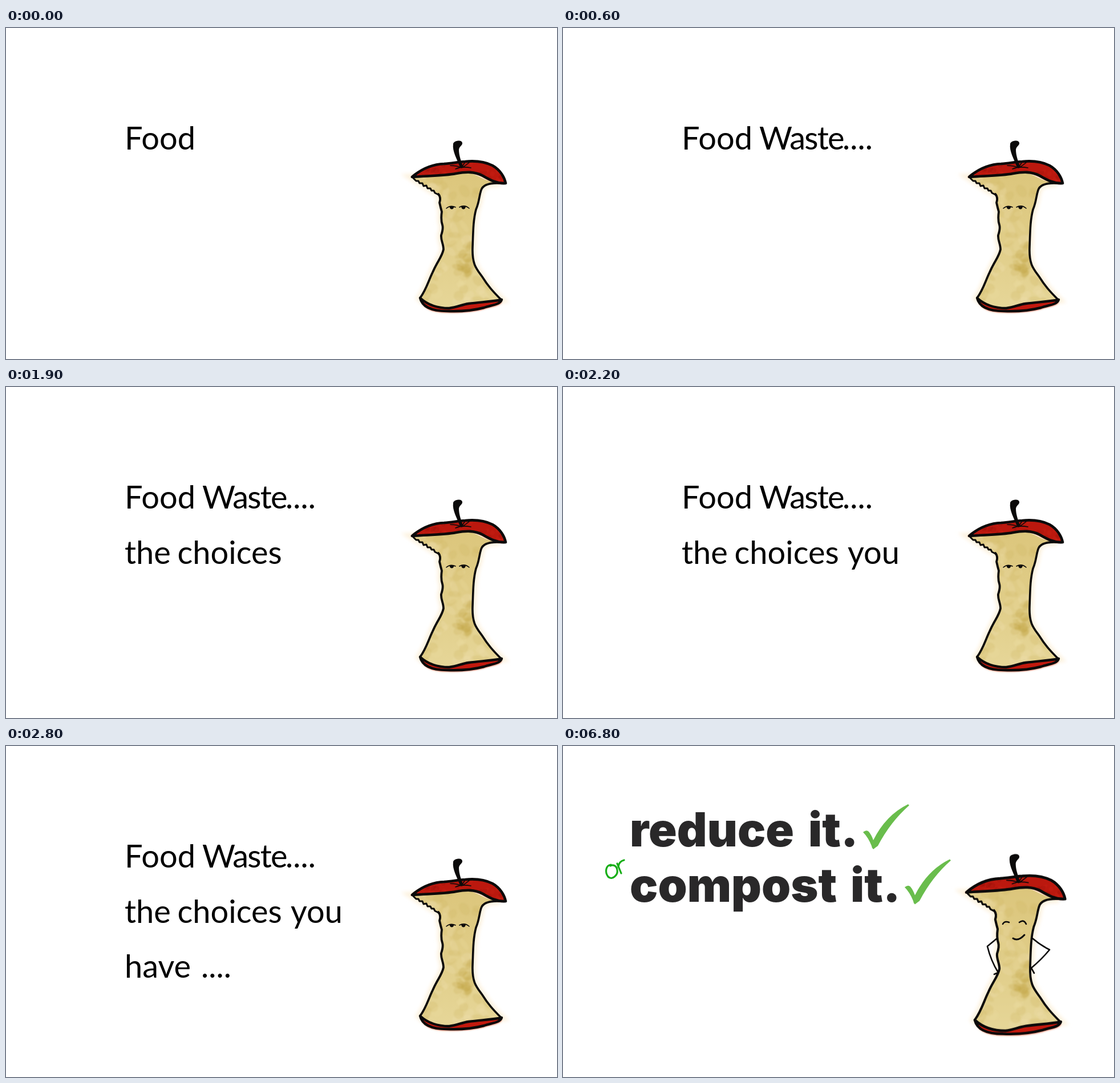
Animation, 966 px wide and 580 px high, one loop 8000 ms. Source, as an HTML page:

```html
<!DOCTYPE html>
<html lang="en">
<head>
<meta charset="utf-8">
<title>Food waste choices</title>
<style>
  html, body { margin: 0; width: 100%; height: 100%; overflow: hidden; background: #fff; }
  svg { display: block; width: 100%; height: 100%; }
  .line { font: 400 56px Lato, sans-serif; fill: #000; }
  .tight { letter-spacing: -.03em; }
  .bold { font: 900 82px Inter, sans-serif; fill: #292829; }
  .ink { fill: none; stroke: #0b0a0a; stroke-linecap: round; stroke-linejoin: round; }
</style>
</head>
<body>
<svg viewBox="0 0 966 580">
  <defs>
    <linearGradient id="flesh" x2="0" y2="1">
      <stop offset="0" stop-color="#dcc67c"/>
      <stop offset=".5" stop-color="#e0cd88"/>
      <stop offset="1" stop-color="#e6d698"/>
    </linearGradient>
    <path id="body" d="M713 262 L741 260 C772 259 783 253 803 253 C824 252 836 270 866 272
      C846 271 836 275 833 284 C829 296 830 304 824 318 C819 337 819 357 818 385 C817 415 825 422 835 436
      C845 452 853 461 868 476 L806 485 Q781 494 760 490 Q739 486 726 473 C737 458 741 442 748 428
      C756 409 764 402 767 388 C767 378 762 372 763 363 Q767 351 765 345 Q762 336 764 322 Q762 315 760 306 Q763 297 758 291 L740 280Z"/>
    <path id="cap" d="M712 261 C726 249 743 239 768 238 C783 237 790 235 805 234 C825 232 841 235 853 241
      C867 249 874 262 876 272 C860 273 848 266 836 259 C821 251 806 252 789 255 C768 259 738 259 712 261Z"/>
    <path id="base" d="M726 473 C738 484 756 491 777 491 C792 489 798 485 811 483 C832 480 849 480 869 476
      C866 485 853 485 838 490 C819 495 796 497 773 496 C747 496 730 490 726 473Z"/>
    <path id="check" fill="#69bd4c" d="M526 151 Q532 146 536 150 Q541 156 544 165 Q566 121 605 102 L607 104
      Q574 133 552 175 Q549 177 544 181 Q541 178 541 175 Q535 160 526 151Z"/>
    <clipPath id="inBody"><use href="#body"/></clipPath>
    <clipPath id="inCap"><use href="#cap"/></clipPath>
    <filter id="soft" x="-30%" y="-30%" width="160%" height="160%"><feGaussianBlur stdDeviation="3"/></filter>
    <filter id="wash" x="-30%" y="-30%" width="160%" height="160%"><feGaussianBlur stdDeviation="1"/></filter>
    <g id="apple">
      <use href="#body" fill="#fdf3e0" stroke="#fdf3e0" stroke-width="14" filter="url(#soft)"/>
      <g fill="#ee5a38" filter="url(#wash)">
        <use href="#cap" x="-3" y="1" opacity=".75"/>
        <use href="#base" x="1" y="3" opacity=".7"/>
      </g>
      <use href="#body" fill="url(#flesh)"/>
      <g clip-path="url(#inBody)"><g id="mottle" filter="url(#wash)"></g></g>
      <use href="#cap" fill="#bb180e"/>
      <g id="grain" clip-path="url(#inCap)"></g>
      <use href="#base" fill="#c2190e"/>
      <use href="#cap" class="ink" stroke-width="4.6"/>
      <use href="#base" class="ink" stroke-width="4.4"/>
      <path class="ink" stroke-width="3.6" d="M866 272 C846 271 836 275 833 284 C829 296 830 304 824 318
        C819 337 819 357 818 385 C817 415 825 422 835 436 C845 452 853 461 868 476"/>
      <path class="ink" stroke-width="3.8" d="M758 291 Q763 297 760 306 Q762 315 764 322 Q762 336 765 345 Q767 351 763 363
        C762 372 767 378 767 388 C764 402 756 409 748 428 C741 442 737 458 726 473"/>
      <path class="ink" stroke-width="3" d="M714 263 l5 5 4 0 2 4 5 0 2 5 5 -1 2 5 5 0 2 4 4 0 2 4 6 3"/>
      <path class="ink" stroke-width="1.6" d="M779 241 Q790 241 799 245 Q806 241 813 235 M788 247 Q800 242 815 245 M799 244 L806 233"/>
      <path fill="#0b0a0a" d="M784 203 C785 197 800 195 800 202 C800 206 795 207 794 213 C794 224 798 233 802 245
        L796 244 C791 230 782 216 784 203Z"/>
    </g>
  </defs>

  <g data-from="0" data-to="4800">
    <use href="#apple"/>
    <path class="ink" stroke-width="1.6" d="M772 316 Q779 310 788 314 M795 314 Q804 309 812 316"/>
    <path d="M777.5 313 h8 q-1 4.500 -4 4.500 t-4 -4.500z M798 313 h8 q-1 4.500 -4 4.500 t-4 -4.500z" fill="#0b0a0a"/>
  </g>

  <g data-from="4800" data-to="8000">
    <use href="#apple" transform="translate(801 345) scale(1.055) translate(-801 -345)"/>
    <path class="ink" stroke-width="2.6" d="M771 312 Q774 306 782 309 M800 309 Q808 303 812 312"/>
    <path class="ink" stroke-width="3" d="M789 337 Q798 343 809 331"/>
    <path class="ink" stroke-width="2.6" d="M761 337 L744 351 Q750 376 763 397 L756 400 M823 337 Q837 349 853 357 Q839 374 821 389 L826 398"/>
    <text class="bold" x="117" y="176">reduce</text>
    <text class="bold" x="430" y="176">it.</text>
    <use href="#check"/>
  </g>

  <g data-from="6800" data-to="8000">
    <text class="bold" x="117" y="272.5">compost</text>
    <text class="bold" x="504" y="272.5">it.</text>
    <use href="#check" x="73" y="96.5"/>
    <path fill="none" stroke="#17ae17" stroke-width="3.2" stroke-linecap="round"
      d="M84 208 C75 209 73 221 79 229 C86 236 97 226 95 217 C94 210 88 207 83 210 M95 206 L102 223 M97 212 Q98 202 107 200"/>
  </g>
  <g id="words"></g>
</svg>
<script>
const LOOP = 8000;
const svgNode = (parent, tag, attributes) => {
  const node = document.createElementNS("http://www.w3.org/2000/svg", tag);
  for (const key in attributes) node.setAttribute(key, attributes[key]);
  return parent.appendChild(node);
};
const byId = id => document.getElementById(id);

let seed = 17;
const random = (low, high) => {
  seed = (seed * 16807) % 2147483647;
  return low + (high - low) * seed / 2147483647;
};

// Overlapping watercolour dabs
function dab(group, count, [left, right, top, bottom], size, colors, opacity) {
  for (let i = 0; i < count; i++) {
    const x = random(left, right), y = random(top, bottom);
    svgNode(group, "ellipse", {
      cx: x, cy: y, rx: random(size * .5, size), ry: random(size * .3, size * .7),
      transform: `rotate(${random(-70, 70)} ${x} ${y})`,
      fill: colors[i % colors.length], opacity
    });
  }
}
dab(byId("mottle"), 130, [725, 865, 255, 490], 13, ["#eee0ae", "#d0b965", "#eadb9f"], .25);
dab(byId("mottle"), 16, [792, 814, 375, 435], 12, ["#b99a35", "#c4a947"], .22);
dab(byId("grain"), 70, [712, 876, 234, 272], 7, ["#860d08", "#d0281a"], .22);

const words = [
  ["Food", 208, 213, 0], ["Waste", 344, 213, 300, "tight"], ["....", 490, 213, 600],
  ["the", 208, 309.5, 1600], ["choices", 300.5, 309.5, 1900], ["you", 499, 309.5, 2200],
  ["have", 208, 406, 2500], ["....", 342, 406, 2800]
];
for (const [word, x, y, from, spacing = ""] of words) {
  svgNode(byId("words"), "text", {
    class: `line ${spacing}`, x, y, "data-from": from, "data-to": 4800
  }).textContent = word;
}

const timed = [...document.querySelectorAll("[data-from]")];
function draw(now) {
  const t = now % LOOP;
  for (const node of timed) {
    const shown = t >= +node.dataset.from && t < +node.dataset.to;
    node.style.display = shown ? "" : "none";
  }
}
function tick() {
  draw(performance.now());
  requestAnimationFrame(tick);
}
tick();
</script>
</body>
</html>
```
